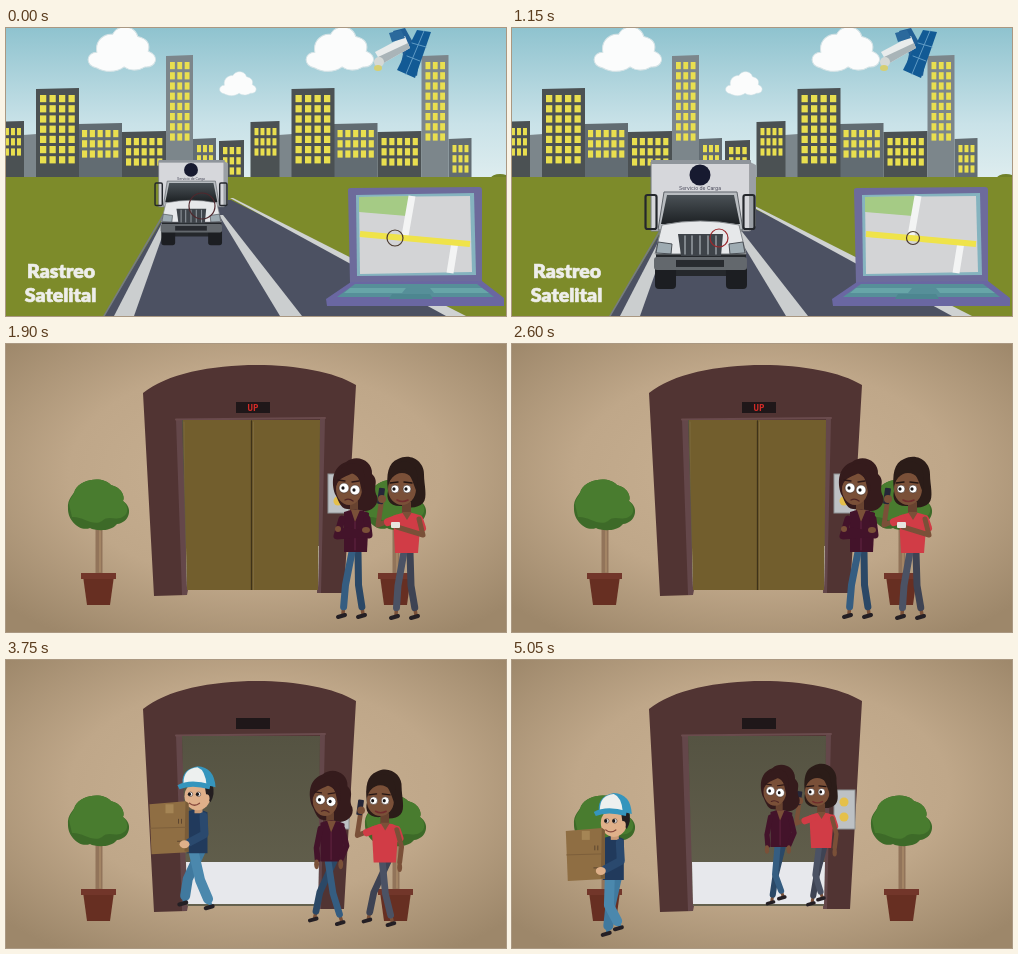
These frames come from a looping animation (500x288 px, 5.1 s). An HTML page:

```html
<!DOCTYPE html>
<html lang="es">
<head>
<meta charset="utf-8">
<style>
  html, body { margin: 0; width: 500px; height: 288px; overflow: hidden; }
  svg { display: block; }
  .title { font: 900 19.500px Lato, "Open Sans", sans-serif; fill: #eeeeea; stroke: #eeeeea; stroke-width: .7; text-anchor: middle; }
  .small { font: 5px Inter, sans-serif; fill: #445; text-anchor: middle; }
  .sign { font: bold 9px "DejaVu Sans Mono", monospace; fill: #d32c28; text-anchor: middle; }
</style>
</head>
<body>
<svg id="stage" width="500" height="288" viewBox="0 0 500 288">
  <defs>
    <linearGradient id="sky" x2="0" y2="1"><stop stop-color="#8fc3cf"/><stop offset=".6" stop-color="#c9e2e8"/><stop offset="1" stop-color="#e2eff0"/></linearGradient>
    <radialGradient id="wall" cx=".5" cy=".45" r=".68"><stop stop-color="#c9b193"/><stop offset=".55" stop-color="#bfa789"/><stop offset="1" stop-color="#9d876a"/></radialGradient>
    <linearGradient id="glass" x2="0" y2="1"><stop stop-color="#4a5156"/><stop offset="1" stop-color="#1d2124"/></linearGradient>
    <linearGradient id="cabin" x2="0" y2="1"><stop stop-color="#555342"/><stop offset="1" stop-color="#64614e"/></linearGradient>
    <clipPath id="doorway"><path d="M177 76H314L312 246H181Z"/></clipPath>
  </defs>
  <g id="city"></g>
  <g id="lobby"></g>
</svg>
<script>
const LOOP = 5100, STEP = 50, CUT = 1750, WALK = 3150, MAN_IN = 3200;
const byId = id => document.getElementById(id);
const clamp = v => Math.max(0, Math.min(1, v));

const rect = (x, y, w, h, fill, extra = '') =>
  `<rect x="${x}" y="${y}" width="${w}" height="${h}" fill="${fill}" ${extra}/>`;
const shape = (d, fill, extra = '') => `<path d="${d}" fill="${fill}" ${extra}/>`;
const line = (d, color, width, extra = '') =>
  `<path d="${d}" fill="none" stroke="${color}" stroke-width="${width}" stroke-linecap="round" stroke-linejoin="round" ${extra}/>`;
const oval = (x, y, rx, ry, fill, extra = '') =>
  `<ellipse cx="${x}" cy="${y}" rx="${rx}" ry="${ry}" fill="${fill}" ${extra}/>`;
const group = (transform, content) => `<g transform="${transform}">${content}</g>`;

// ---------- City ----------

const DARK = '#4b5153', MID = '#626c72', PALE = '#7c868b';

function building(x, top, w, cols, rows, color) {
  let out = shape(`M${x} ${top + 1}L${x + w} ${top}V150H${x}Z`, color);
  const pitch = (w - 5) / cols;
  for (let r = 0; r < rows; r++)
    for (let c = 0; c < cols; c++)
      out += rect(x + 4 + c * pitch, top + 7 + r * 10.2, pitch * .66, 7.2, '#e9df4f');
  return out;
}

const skyline = x => group(`translate(${x} 0)`,
  building(17, 106, 14, 0, 0, PALE) +
  building(-11, 93, 29, 4, 3, DARK) +
  building(72, 95, 44, 5, 3, MID) +
  building(116, 103, 44, 5, 3, DARK) +
  building(187, 110, 23, 3, 3, MID) +
  building(30, 60, 43, 4, 7, DARK) +
  building(160, 27, 27, 3, 8, PALE));

const cloud = (x, y, s) => group(`translate(${x} ${y}) scale(${s})`,
  shape('M-24 19C-36 17-34 4-24 4C-26-8-16-14-9-13C-4-23 12-22 15-11C24-9 27-4 25 3C36 7 33 19 22 18C14 23 6 21 2 18C-6 24-17 23-24 19Z',
    '#fbfcfc', 'stroke="#d5e3e6"'));

const satellite =
  shape('M387 3L399 0L414 27L411 48L394 40L397 26Z', '#225f95') +
  shape('M411 2L425 4L409 50L391 42Z', '#125a95') +
  line('M418 3L400 46M406 15L420 19M401 28L414 33', '#5f9ac4', 1) +
  shape('M369 24L399 8L404 20L376 36Z', '#e9ecec') +
  shape('M372 29L402 15L404 20L376 36Z', '#a9b4b8') +
  shape('M383 5L395 2L399 10L386 14Z', '#2b699c') +
  oval(373, 34, 5, 5, '#d5d9d6') + oval(372, 40, 4, 3, '#d6cf71');

const laptop =
  shape('M342 162Q342 160 345 160L473 159Q476 159 476 162V257L344 256Z', '#6d6b9b') +
  shape('M350 167L468 165L470 247L351 248Z', '#85b3bf') +
  shape('M353 169L464 168L466 244L354 246Z', '#d3d4d6') +
  shape('M353 169L404 168L401 188L353 184Z', '#a5cb85') +
  line('M406 168L399 208M449 214L444 245', '#f3f4f4', 7, 'style="stroke-linecap:butt"') +
  line('M354 206L464 216', '#efe34a', 6, 'style="stroke-linecap:butt"') +
  shape('M345 254L476 253L498 270V278H321L320 271Z', '#6a67a2') +
  shape('M349 256H471L488 269H331Z', '#568f99') +
  shape('M344 260H400L396 265H338ZM424 260H476L483 265H428Z', '#67a5a8') +
  shape('M386 266H424L427 271H383Z', '#4d8690');

const cityBack =
  rect(0, 0, 500, 160, 'url(#sky)') +
  cloud(116, 20, 1.05) + cloud(334, 20, 1.05) + cloud(232, 55, .57) +
  skyline(0) + building(213, 112, 25, 3, 3, DARK) + skyline(255.5) +
  oval(494, 150, 9, 4, '#6f8028') + rect(0, 149, 500, 139, '#7d8b2a') +
  shape('M168 172H225L457 288H98Z', '#4c5162') +
  line('M166 172L98 288', '#777d80', 1.5) +
  shape('M224 170H227L460 288H440Z', '#cfd2d2') +
  shape('M156 195L161 195L128 288H108Z', '#cbcecf') +
  shape('M213 187L217 187L296 288H274Z', '#cbcecf') + satellite;

const cityFront = laptop +
  '<text class="title" x="55" y="250">Rastreo</text><text class="title" x="54.500" y="274">Satelital</text>';

const truck =
  rect(144, 222, 90, 26, '#25282c', 'rx="4"') +
  rect(143, 236, 21, 25, '#1c1e22', 'rx="4"') + rect(214, 236, 21, 25, '#1c1e22', 'rx="4"') +
  shape('M139 134H238V203H139Z', '#d6d7db', 'stroke="#74797f"') +
  shape('M238 134L244 137V198L238 203Z', '#9a9fa5') + rect(139, 132, 100, 4, '#8f959b') +
  oval(188, 147, 10.5, 10.5, '#171a30') +
  '<text class="small" x="188" y="162">Servicio de Carga</text>' +
  shape('M152 164H225L231 202H146Z', '#b9bdc1', 'stroke="#60656a"') +
  shape('M155 167H222L228 196H149Z', 'url(#glass)') +
  shape('M150 197Q188 189 227 197L234 226H143Z', '#e6e8ea', 'stroke="#85898d"') +
  shape('M166 206H211L209 228H169Z', '#3f444a') +
  line('M173 208V226M180 208V226M188 208V226M196 208V226M204 208V226', '#969ca2', 1.5) +
  shape('M146 214L160 216L159 226L144 225ZM231 214L217 216L218 226L233 225Z', '#9eabb2', 'stroke="#4b5056"') +
  rect(142, 229, 93, 13, '#63686d', 'rx="3"') + rect(164, 232, 48, 7, '#282b30') +
  rect(133.500, 167, 11, 34, 'none', 'rx="2" stroke="#24272c" stroke-width="2.200"') +
  rect(231.500, 167, 11, 34, 'none', 'rx="2" stroke="#24272c" stroke-width="2.200"');

function drawCity(t) {
  const k = t / 1150, s = .66 * Math.exp(.361 * t / 1000);
  const ring = (x, y, r, color) =>
    oval(x, y, r, r, 'none', `stroke="${color}" stroke-width="1.200"`);
  byId('truck').setAttribute('transform', `translate(${185 + 3 * k} 132) scale(${s}) translate(-188 -132)`);
  byId('rings').innerHTML =
    ring(196 + 11 * k, 178 + 32 * k, Math.max(6, 13 - 4 * k), `rgb(${80 + 75 * clamp(k)},40,45)`) +
    ring(389 + 12 * k, 210, 8 - 1.5 * k, '#4b3a2f');
}

// ---------- Lobby ----------

const plant = x => group(`translate(${x} 0)`,
  rect(-3.500, 178, 7, 54, '#92745a') + line('M1 186V228', '#a88a68', 1.5) +
  shape('M-31 165C-32 154-25 151-24 146C-18 134 5 132 12 141C24 144 26 154 24 157C35 164 30 179 18 180C12 188-4 187-9 184C-19 188-31 177-31 165Z', '#3d6a28') +
  shape('M-30 160C-29 154-25 151-24 146C-18 134 5 132 12 141C24 144 26 154 24 157C30 162 29 170 25 172C17 178 10 170 3 177C-6 183-16 172-27 173Z', '#497c2f') +
  shape('M-16 232H15L11 261H-12Z', '#672f22') + rect(-18, 229, 35, 6, '#72362a'));

const lobbyBack =
  rect(0, 0, 500, 288, 'url(#wall)') + plant(93) + plant(390) +
  shape('M137 49C180 13 305 13 350 41L338 249H312V246H181V251L148 252Z', '#513433') +
  shape('M170 76H176L182 246L181 251H176ZM314 75H319L315 249H311Z', '#64474a') +
  line('M170 75.500L319 74', '#6a4b4d', 2) +
  rect(230, 58, 34, 11, '#1f1719') +
  shape('M176 76H314L312 246H181Z', 'url(#cabin)') + shape('M180 202H313L312 244H181Z', '#e7e8ec') +
  rect(322, 130, 21, 39, '#bdc1c4', 'stroke="#8e9294"') +
  oval(332, 142, 4.5, 4.5, '#e5c04a') + oval(332, 157, 4.5, 4.5, '#e5c04a');

function leg(hipX, hipY, foot, jeans, skin, width) {
  const kneeX = (hipX + foot.x) / 2 - 2 - foot.lift * .7, kneeY = hipY / 2 - foot.lift * .3;
  const y = -4 - foot.lift, mix = .75;
  const cuffX = kneeX + (foot.x - kneeX) * mix, cuffY = kneeY + (y - kneeY) * mix;
  return line(`M${kneeX} ${kneeY}L${foot.x} ${y}`, skin, 3.5) +
    line(`M${hipX} ${hipY}L${kneeX} ${kneeY}L${cuffX} ${cuffY}`, jeans, width) +
    line(`M${foot.x + 2} ${y + 1}L${foot.x - 5} ${y + 3}`, '#241f24', 4);
}

function gait(t, stride, lean = 0) {
  const phase = (15 + .36 * (t - 4400)) * Math.PI / 180;
  return [0, Math.PI].map(shift => ({
    x: lean + stride * Math.cos(phase + shift),
    lift: Math.max(0, Math.sin(phase + shift)) * 6
  }));
}
const STAND = [{ x: 10, lift: 0 }, { x: -10, lift: 0 }];

const eye = (x, y, r, dx = -1) =>
  oval(x, y, r, r, '#fff', 'stroke="#3b2a26" stroke-width=".6"') + oval(x + dx, y, 1.6, 1.8, '#1b1718');

function curlyWoman(t, walking) {
  const skin = '#7a5038', top = '#43132a', feet = walking ? gait(t, 18, -1) : STAND;
  const hands = walking
    ? line('M-9-100L-13-80L-12-68M14-99L18-82L12-68', top, 6) + oval(-13, -63, 2.5, 5, skin) + oval(12, -63, 2.5, 5, skin)
    : line('M-11-99L-16-82L10-84M14-99L16-83L-8-87', top, 7) + oval(-15, -89, 3, 3, skin) + oval(13, -88, 4, 3, skin);
  return leg(5, -66, feet[0], '#2b4866', skin, 7) + leg(-1, -66, feet[1], '#355d81', skin, 7) +
    shape('M-7-156C4-165 20-157 19-144C27-136 19-132 24-122C27-111 14-104 7-108L-5-109C-13-108-15-120-18-124C-22-136-21-151-7-156Z', '#351b1c') +
    rect(-3, -117, 8, 12, '#684330') +
    shape('M-9-106Q4-111 16-105L14-66H-9Z', top) + shape('M-2-108H7L2-96Z', skin) +
    line('M2-96V-68', '#632542', 1) +
    oval(-4, -129, 13, 16, skin) +
    shape('M-17-132C-19-146-8-158 4-154C14-151 13-132 10-122C7-134 7-141 1-146C-6-141-13-142-17-132Z', '#351b1c') +
    eye(-9, -130, 5) + eye(2, -128, 5) +
    line('M-15-138L-8-137M-1-136L6-137', '#2c1717', 1.3) +
    line('M-8-118Q-4-120 0-117', '#4d2424', 1.3) + hands;
}

function phoneWoman(t, walking) {
  const skin = '#7a5038', top = '#d13c46', feet = walking ? gait(t, 16, -4) : STAND;
  const arm = walking
    ? line('M13-100L18-82L16-66', skin, 5) + oval(16, -61, 2.5, 5, skin)
    : line('M13-100L17-84L-9-92', skin, 5) + rect(-15, -97, 9, 6, '#e7e5df', 'rx="1"');
  return leg(4, -67, feet[0], '#3e4353', skin, 7) + leg(-2, -67, feet[1], '#4b5264', skin, 7) +
    shape('M-8-160C6-167 19-156 18-144C18-135 22-121 17-116Q10-109-4-113C-17-112-20-120-18-128C-20-145-18-156-8-160Z', '#2b1c18') +
    rect(-4, -117, 9, 13, '#684330') +
    oval(-4, -130, 14, 16, skin) +
    shape('M-18-134C-19-150-11-159 1-157C13-155 13-139 11-126C7-137 4-146-2-151C-9-145-15-144-18-134Z', '#2b1c18') +
    shape('M-13-103Q2-110 15-103L12-66H-11Z', top) + shape('M-4-107H6L1-99Z', skin) +
    eye(-11, -130, 4) + eye(1, -130, 4) +
    line('M-16-136L-8-137M-2-137L6-136', '#211413', 1.4) +
    line('M-9-119Q-4-116 2-119', '#702c2d', 1.6) +
    line('M-12-100L-28-94L-24-121', skin, 5) + line('M-10-100L-18-97', top, 8) +
    rect(-28, -131, 6, 16, '#252638', 'rx="1" transform="rotate(8 -25 -123)"') +
    oval(-24, -120, 4, 4, skin) + line('M13-100L16-91', top, 8) + arm;
}

function courier(t) {
  const skin = '#dfb08a', blue = '#4b88ad', feet = gait(t, 17);
  return leg(3, -58, feet[0], '#40799e', '#40799e', 10) + leg(-4, -58, feet[1], blue, blue, 10) +
    shape('M-10-98Q1-102 10-97L10-56H-11Z', '#213a5c') + rect(-3, -104, 8, 8, '#c99a76') +
    oval(0, -113, 13, 14, skin) + shape('M7-125H15Q18-115 13-107L9-112Z', '#231e20') +
    oval(9, -111, 3, 4, skin) +
    shape('M-15-126Q-16-140 0-143Q17-142 18-122L10-124Z', '#3595bd') +
    shape('M-14-126Q-14-141 0-142Q8-139 9-124Z', '#edf0ef') +
    shape('M-20-124Q-8-131 13-125L12-120Q-6-125-18-120Z', '#3595bd') +
    eye(-7, -115, 2.2) + eye(1, -115, 2.2) + line('M-8-106Q-3-102 2-106', '#86483c', 1.3) +
    shape('M-48-105L-12-108L-9-106V-57L-46-55Z', '#8f6e43') +
    shape('M-12-108L-9-106V-57L-13-58Z', '#7a5c38') +
    line('M-47-81L-11-82', '#7d5f3b', 1) + rect(-32, -105, 8, 9, '#a58555') +
    line('M-19-90V-86M-16-90V-86M-20-68H-15', '#5d4630', 1) +
    line('M6-93L7-75L-8-67', '#2a496e', 8) + oval(-13, -65, 5, 4, skin);
}

function drawLobby(t) {
  const walking = t >= WALK, d = t - 3250;
  const gap = 68 * clamp((t - 3160) / 500);
  const door = (x, shift) => rect(x + shift, 76, 69, 172, '#725e2d') +
    line(`M${x + shift + 2} 78V246`, '#7d6a3e', 1);
  byId('doors').innerHTML = gap < 68
    ? door(176, -gap) + door(245.500, gap) + (gap ? '' : line('M245.500 77V247', '#3e3219', 1.3))
    : '';
  byId('sign').style.display = walking ? 'none' : '';

  const place = (x, y, s, content) => group(`translate(${x} ${y}) scale(${s})`, content);
  const phoneX = walking ? 405 - .0535 * d : 400;
  const curlyX = walking ? 345 - .0437 * d : 347;
  const groundY = walking ? 273 - .0158 * d : 274;
  const size = walking ? 1 - .000070 * d : 1;
  byId('people').innerHTML =
    place(phoneX, groundY + 1, size, phoneWoman(t, walking)) +
    place(curlyX, groundY, size, curlyWoman(t, walking)) +
    (t >= MAN_IN ? place(226 - .069 * d, 239 + .0205 * d, 1, courier(t)) : '');
}

// ---------- Playback ----------

byId('city').innerHTML = cityBack + `<g id="truck">${truck}</g>` + cityFront + '<g id="rings"></g>';
byId('lobby').innerHTML = lobbyBack +
  '<text id="sign" class="sign" x="247" y="66.500">UP</text>' +
  '<g id="doors" clip-path="url(#doorway)"></g><g id="people"></g>';

function render(now) {
  const t = Math.floor(now % LOOP / STEP) * STEP, inCity = t < CUT;
  byId('city').style.display = inCity ? '' : 'none';
  byId('lobby').style.display = inCity ? 'none' : '';
  (inCity ? drawCity : drawLobby)(t);
}

const start = performance.now();
function tick() {
  render(performance.now() - start);
  requestAnimationFrame(tick);
}
tick();
</script>
</body>
</html>
```
